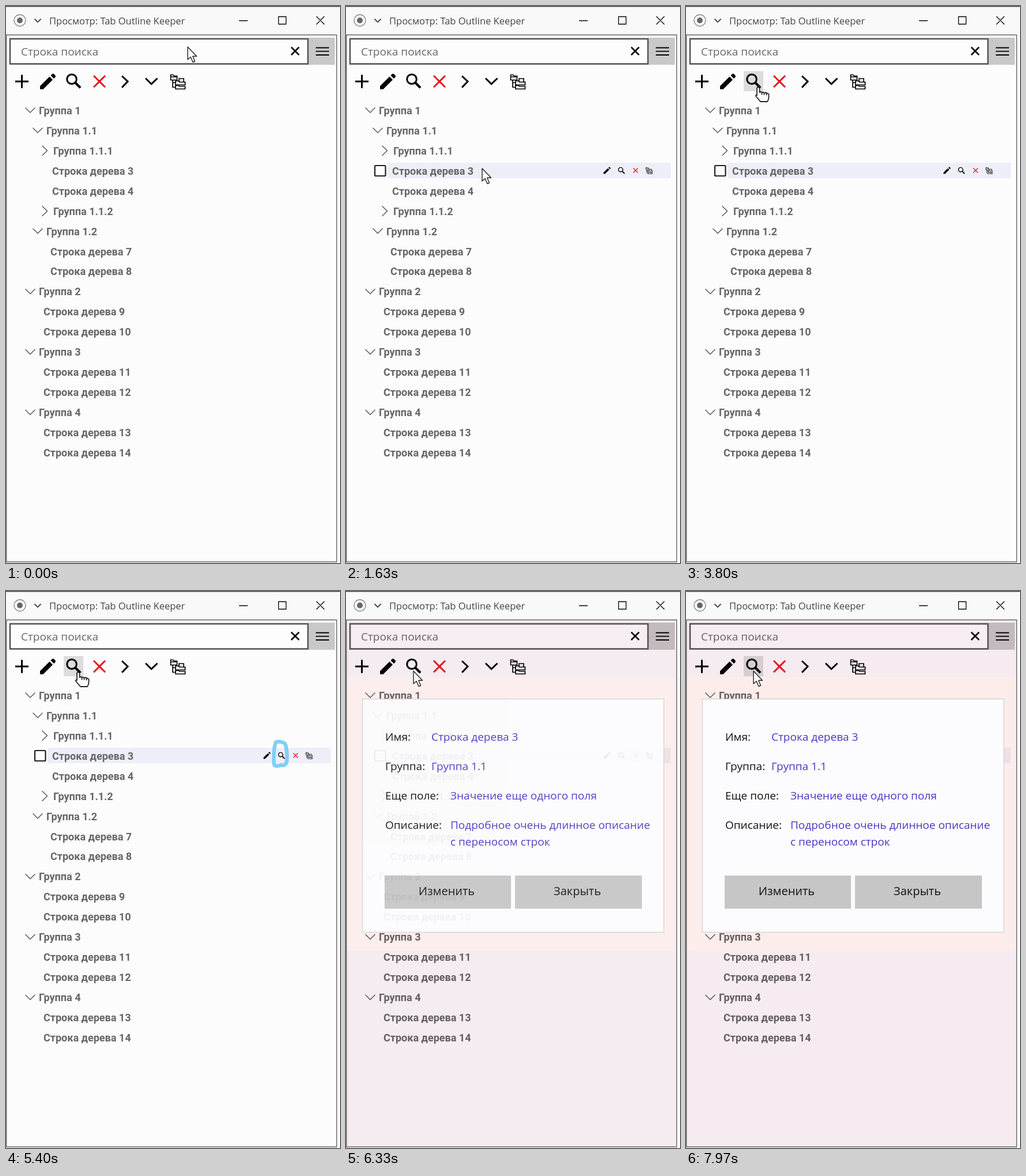
These frames come from a looping animation (579 px wide and 967 px high, 8 s). An HTML page:

```html
<!DOCTYPE html>
<html lang="ru">
<head>
<meta charset="utf-8">
<title>Просмотр дерева</title>
<style>
  html, body { margin: 0; width: 100%; height: 100%; overflow: hidden; background: #fcfcfd; }
  svg { display: block; width: 579px; height: 967px; }
  text { font-family: "Open Sans", "Noto Sans", sans-serif; font-size: 19px; fill: #111; }
  #tree text { font: 700 18px Roboto, sans-serif; fill: #666; }
  #tree path { fill: none; stroke: #555; stroke-width: 1.4; }
  .line { fill: none; stroke: #000; }
  .value { fill: #4936c4; }
  .button { fill: #c6c6c6; }
  .middle { font-size: 20px; text-anchor: middle; }
  .anim { animation: 8s linear infinite; }

  #pointer { animation-name: travel; }
  #arrow { animation-name: arrow; }
  #hand { animation-name: hand; }
  #pass { animation-name: pass; }
  #rowShade { animation-name: shade; }
  #rowTools { animation-name: tools; }
  #zoomShade { animation-name: zoom; }
  #deleteShade { animation-name: erase; }
  #marker { animation-name: marker; }
  .modal { animation-name: modal; }

  @keyframes travel {
    0%, .375% { transform: translate(315px, 71px); animation-timing-function: ease-in-out; }
    7.875%, 33.375% { transform: translate(236px, 282px); animation-timing-function: ease-in-out; }
    39.625%, 100% { transform: translate(117px, 139px); }
  }
  @keyframes arrow {
    0%, 43.75% { opacity: 1; }
    45.625%, 74.125% { opacity: 0; }
    75%, 100% { opacity: 1; }
  }
  @keyframes hand {
    0%, 43.75% { opacity: 0; }
    45.625%, 74.125% { opacity: 1; }
    75%, 100% { opacity: 0; }
  }
  @keyframes pass {
    0%, 35.2% { opacity: 0; }
    36.2%, 37.6% { opacity: 1; }
    39.5%, 100% { opacity: 0; }
  }
  @keyframes shade {
    0%, 10.875% { opacity: 0; }
    12.125%, 100% { opacity: 1; }
  }
  @keyframes tools {
    0%, 10.875% { opacity: 0; }
    12.125%, 15.375% { opacity: .5; }
    20.375%, 100% { opacity: 1; }
  }
  @keyframes zoom {
    0%, 39.6% { opacity: 0; }
    41%, 74.125% { opacity: 1; }
    75.2%, 85% { opacity: 0; }
    87%, 100% { opacity: 1; }
  }
  @keyframes erase {
    0%, 74.125% { opacity: 0; }
    75%, 79.5% { opacity: 1; }
    80%, 100% { opacity: 0; }
  }
  @keyframes marker {
    0%, 63.75% { opacity: 0; }
    67.5%, 69.6% { opacity: 1; }
    73.75%, 100% { opacity: 0; }
  }
  @keyframes modal {
    0%, 74.125% { opacity: 0; }
    79.5%, 100% { opacity: 1; }
  }
</style>
</head>
<body>
<svg viewBox="0 0 579 967">
  <defs>
    <!-- toolbar icons, centred on the origin -->
    <g id="pencil">
      <path d="M-13.5 13.5V8L3-8.500 8.500-3-8 13.500ZM5-10.500 7.500-13Q9-14 10.500-13L13-10.500Q14-9 13-7.500L10.500-5Z"/>
    </g>
    <g id="lens" class="line" stroke-width="3">
      <circle cx="-3" cy="-4" r="8.300"/>
      <path d="M3 2 12 11" stroke-width="4"/>
    </g>
    <path id="cross" d="M-10-10 10 10M10-10-10 10" fill="none" stroke="#ea0c14" stroke-width="3"/>
    <g id="nodes" class="line" stroke-width="1.700">
      <path d="M-12.500-11.500h4l2 2h5v7h-11ZM-12.500-8h11M-9-2V10H-4M-9 2H-4"/>
      <path d="M-4-1h5l1.500 2h10v5h-16.500ZM-4 7h5l1.500 1.500h10v4.500h-16.500ZM2 1V-5H10V1"/>
    </g>
  </defs>

  <rect width="579" height="967" fill="#fcfcfd"/>

  <!-- title bar -->
  <rect width="579" height="50" fill="#f9f9fa"/>
  <path d="M0 .7H579" stroke="#444" stroke-width="1.400"/>
  <circle cx="24" cy="25" r="10" fill="none" stroke="#888" stroke-width="1.300"/>
  <circle cx="24" cy="25" r="5" fill="#666"/>
  <path class="line" d="M49.500 22.500 55 28 60.500 22.500" style="stroke:#444" stroke-width="1.800"/>
  <text x="75" y="32" style="font-size:16.500px;fill:#444">Просмотр: Tab Outline Keeper</text>
  <path class="line" d="M404 25.500H419M472.500 18.500H485.500V31.500H472.500ZM538 18 552 32M552 18 538 32" stroke-width="1.300"/>

  <!-- search field -->
  <rect x="7" y="57" width="516.500" height="43.500" fill="#fdfdfe" stroke="#555" stroke-width="2.600"/>
  <text x="26" y="86" style="fill:#666">Строка поиска</text>
  <path class="line" d="M494.500 71.500 508 85M508 71.500 494.500 85" stroke-width="2.600"/>
  <rect x="525" y="55" width="45" height="47" fill="#c8c8c8"/>
  <path class="line" d="M537 72.500H560M537 78.700H560M537 85H560" stroke-width="1.800"/>

  <!-- toolbar -->
  <rect id="zoomShade" class="anim" x="100" y="113" width="34" height="35" fill="#dcdcdc"/>
  <path class="line" d="M16 131H39M27.500 119.500V142.500" stroke-width="3"/>
  <use href="#pencil" x="72.500" y="131"/>
  <use href="#lens" x="117" y="131"/>
  <use href="#cross" x="162" y="131"/>
  <path class="line" d="M201 121.500 211 131 201 141.500M242 125.500 252 135.500 262.500 125.500" stroke-width="3"/>
  <use href="#nodes" x="298" y="131"/>

  <!-- tree -->
  <rect id="pass" class="anim" x="31" y="237" width="529" height="28" fill="#dedede"/>
  <rect id="rowShade" class="anim" x="72" y="272" width="491" height="27" fill="#eeeef8"/>
  <g id="tree"></g>
  <g id="rowTools" class="anim">
    <rect x="50" y="277" width="18.500" height="18" rx="1.500" fill="#fdfdfe" stroke="#222" stroke-width="2.200"/>
    <rect id="deleteShade" class="anim" x="493" y="276" width="18" height="19" fill="#f0dcea"/>
    <use href="#pencil" transform="translate(452.500 285.500) scale(.45)"/>
    <use href="#lens" transform="translate(477.500 286) scale(.46)"/>
    <use href="#cross" transform="translate(502 285.500) scale(.4)"/>
    <use href="#nodes" transform="translate(525.500 285.500) scale(.45)"/>
  </g>
  <path id="marker" class="anim" fill="none" stroke="#7fcff7" stroke-width="6.500" stroke-linecap="round" stroke-linejoin="round"
    d="M474 303C467 305 464 303 464.500 297 464 284 465 270 467.500 263 471 260 482 262 484 266 487 274 488 288 486.500 297 485 302 481 304 477 302"/>

  <!-- tint and dialog -->
  <g class="anim modal" style="mix-blend-mode:multiply">
    <path d="M1 51H573V965H1Z" fill="#f8eef3"/>
    <path d="M1 150H573V625H1Z" fill="#fff0ed"/>
  </g>
  <path class="line" d="M0 50.300H574M.7 50V965M573.300 50V965M0 965H574" style="stroke:#666" stroke-width="1.400"/>
  <g class="anim modal">
    <rect x="28.500" y="187.500" width="522.500" height="405" fill="#fcfcfe" stroke="#d8d4d8" stroke-width="1.500"/>
    <text x="68" y="260">Имя:</text><text class="value" x="148" y="260">Строка дерева 3</text>
    <text x="68" y="311">Группа:</text><text class="value" x="148" y="311">Группа 1.1</text>
    <text x="68" y="362">Еще поле:</text><text class="value" x="181" y="362">Значение еще одного поля</text>
    <text x="68" y="413">Описание:</text><text class="value" x="181" y="413">Подробное очень длинное описание</text>
    <text class="value" x="181" y="442">с переносом строк</text>
    <rect class="button" x="67" y="494" width="219" height="57.500"/>
    <rect class="button" x="293" y="494" width="220" height="57.500"/>
    <text class="middle" x="174.500" y="528">Изменить</text>
    <text class="middle" x="401" y="528">Закрыть</text>
  </g>

  <g id="pointer" class="anim" fill="#fff" stroke="#222" stroke-width="1.400" stroke-linejoin="round">
    <path id="arrow" class="anim" d="M0 0V22L5 17.500 9 26.500 12.500 25 8.700 16.300H15.500Z"/>
    <path id="hand" class="anim" stroke-width="1.800"
      d="M6 16V4Q6 2 8 2T10.500 4V11Q12 9 14.500 11 16.500 9.500 18.500 12 20.500 10.500 23 12L26.500 14V20Q26 24 24 27H12L4 17.500Q3.500 14.500 6 16ZM14.500 11V15M18.500 12V15.500M22.500 12.500V16"/>
  </g>
</svg>
<script>
  // [text x, label, chevron: "v" open, ">" closed]
  const rows = [
    [57, "Группа 1", "v"], [70, "Группа 1.1", "v"], [82, "Группа 1.1.1", ">"],
    [80, "Строка дерева 3"], [80, "Строка дерева 4"], [82, "Группа 1.1.2", ">"],
    [70, "Группа 1.2", "v"], [77, "Строка дерева 7"], [77, "Строка дерева 8"],
    [57, "Группа 2", "v"], [65, "Строка дерева 9"], [65, "Строка дерева 10"],
    [57, "Группа 3", "v"], [65, "Строка дерева 11"], [65, "Строка дерева 12"],
    [57, "Группа 4", "v"], [65, "Строка дерева 13"], [65, "Строка дерева 14"]
  ];
  const chevron = (kind, x, y) =>
    kind === "v" ? `<path d="M${x - 23.5} ${y - 5}l8.500 8.500 8.500-8.500"/>`
    : kind === ">" ? `<path d="M${x - 19.5} ${y - 9}l9 8.700-9 8.700"/>` : "";

  document.getElementById("tree").innerHTML = rows.map(([x, label, kind], i) => {
    const y = 181.5 + i * 34.96;
    return chevron(kind, x, y) + `<text x="${x}" y="${y + 6.3}">${label}</text>`;
  }).join("");
</script>
</body>
</html>
```
